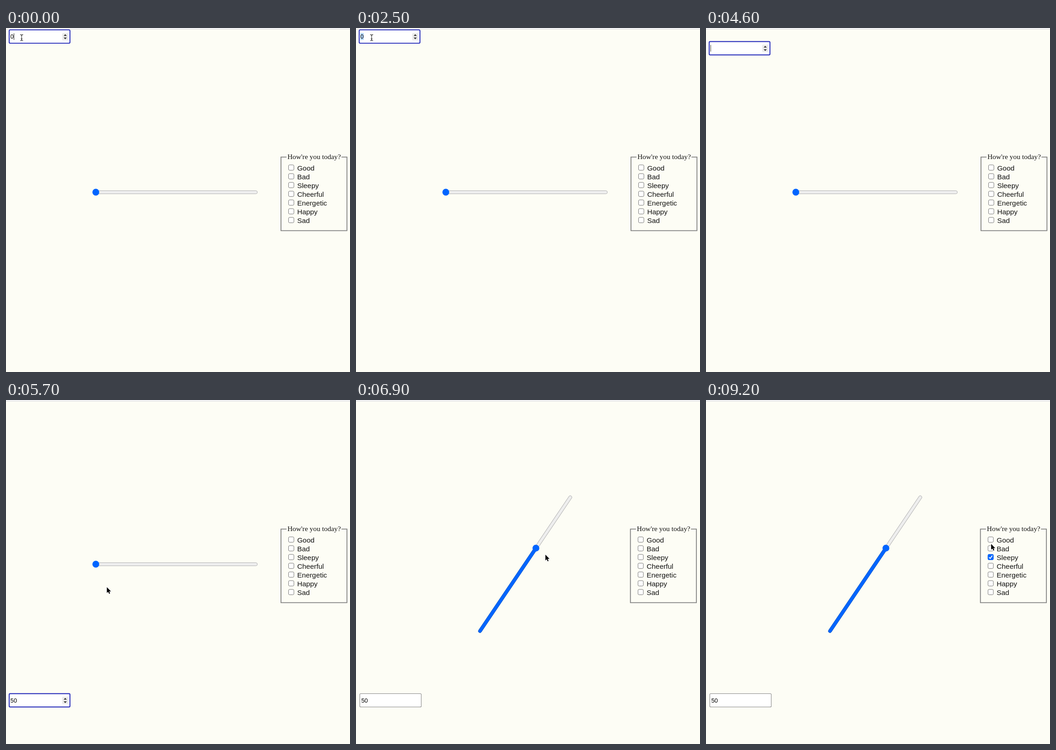
Recreate the animation shown at these times as an HTML page. Size 748 by 748 pixels, loop 9.5 s.

```html
<!DOCTYPE html>
<html lang="en">
<head>
<meta charset="utf-8">
<title>Moving inputs</title>
<style>
  html, body { margin: 0; width: 100%; height: 100%; overflow: hidden; background: #fdfdf5; }
  svg { display: block; width: 748px; height: 748px; }
  text { font-family: "Liberation Sans", Arial, sans-serif; font-size: 15.35px; fill: #111; }
  .legend { font-family: "Liberation Serif", "Times New Roman", serif; }
  .value { font-size: 12.8px; fill: #000; }
  .line { fill: none; stroke: #808080; stroke-width: 1.8; }
  .box { fill: #fff; stroke: #767676; stroke-width: 1; }
</style>
</head>
<body>
<svg viewBox="0 0 748 748">
  <rect width="748" height="2" fill="#fff"/>
  <rect y="1.6" width="748" height="1.4" fill="#dcdce0"/>

  <g id="slider">
    <rect id="track" x="189" y="353.7" width="357.6" height="6.8" rx="3.4"/>
    <rect id="fill" x="188.8" y="353.5" height="7.2" rx="3.6" stroke-width=".8"/>
    <circle id="thumb" cy="357" r="7.4"/>
  </g>

  <g id="form">
    <path class="line" d="M610 280.6H597.9V440.6H741.4V280.6H729.5"/>
    <text class="legend" x="612" y="285.4">How're you today?</text>
  </g>

  <g id="input">
    <rect id="frame" height="29" rx="2" fill="#fff"/>
    <rect id="mark" x="9.5" y="11" width="7.3" height="15" fill="#b3d7fe"/>
    <text id="value" class="value" y="23.3"></text>
    <g id="spin">
      <rect x="122" y="11" width="14" height="16" rx="2" fill="#ececec"/>
      <path d="M125.3 17.2L128.8 13.4L132.3 17.2ZM125.3 20.8L128.8 24.6L132.3 20.8Z" fill="#333"/>
    </g>
    <rect id="caret" y="11.5" width="1" height="14.5" fill="#222"/>
  </g>

  <path id="beam" d="M30.8 14.4Q34 14.4 34 16.6Q34 14.4 37.2 14.4M34 16V26M30.8 27.8Q34 27.8 34 25.6Q34 27.8 37.2 27.8M32.3 23.6H35.7" fill="none" stroke="#222" stroke-width="1.1"/>
  <path id="arrow" d="M0 0V12.6L2.9 9.9L4.9 14.5L7 13.6L5 9.2H9Z" fill="#000" stroke="#fff" stroke-width="1.5" paint-order="stroke"/>
</svg>
<script>
const LOOP = 9500, STEP = 100;
const el = id => document.getElementById(id);
const set = (id, attrs) => {
  for (const k in attrs) el(id).setAttribute(k, attrs[k]);
};
const show = (id, on) => { el(id).style.display = on ? '' : 'none'; };
const within = (t, ...spans) => spans.some(([a, b]) => t >= a && t < b);

// Last entry [time, value] that has begun
const stepAt = (keys, t) => keys.filter(k => k[0] <= t).pop()[1];

// Linear blend of every column in [time, ...values]
function blend(keys, t) {
  const i = keys.findIndex(k => k[0] > t);
  if (i < 0) return keys[keys.length - 1].slice(1);
  if (i === 0) return keys[0].slice(1);
  const a = keys[i - 1], b = keys[i], p = (t - a[0]) / (b[0] - a[0]);
  return a.slice(1).map((v, n) => v + (b[n + 1] - v) * p);
}

const moods = ['Good', 'Bad', 'Sleepy', 'Cheerful', 'Energetic', 'Happy', 'Sad'];
el('form').insertAdjacentHTML('beforeend', moods.map((mood, i) => {
  const y = 303.5 + i * 19.03;
  return `<rect class="box" x="614.4" y="${y - 5.8}" width="11.6" height="11.6" rx="2.3"/>
    <text x="633.2" y="${y + 6}">${mood}</text>`;
}).join('') + `<g id="check"><rect x="613.9" y="335.3" width="12.6" height="12.6" rx="2.4" fill="#0065ff"/>
  <path d="M616.6 341.9L619.2 344.6L623.8 338.2" fill="none" stroke="#fff" stroke-width="1.9"/></g>`);

const typed = [[0, '0'], [3000, '2'], [3200, '20'], [4300, '2'], [4400, ''], [4800, '5'], [4900, '50']];
const heights = typed.filter(k => k[1] !== '');  // an empty field keeps its place
const drag = [[6200, 0], [6500, .235], [6800, .622]];
const mouse = [
  [5200, 165, 236], [5700, 219.3, 407], [5900, 213, 392], [6200, 195.5, 352],
  [6500, 303.5, 349.5], [6800, 411.8, 336.3], [7200, 411.8, 336.3], [7700, 618, 340],
  [8300, 618, 340], [8700, 620, 317], [8800, 620, 317], [9200, 620, 313]
];

function draw(t) {
  const focus = t < 6300;
  const shift = focus ? 0 : t < 6700 ? -1.6 : -1.2;
  const text = stepAt(typed, t);
  const left = focus ? 9.6 : 12.4 + shift * .8;

  set('input', { transform: `translate(0 ${stepAt(heights, t) * 12.687})` });
  set('frame', focus
    ? { x: 6.9, y: 4.1, width: 132.2, stroke: '#1c22b8', 'stroke-width': 1.9 }
    : { x: 9.5 + shift, y: 4.2, width: 133.6, stroke: '#858585', 'stroke-width': 1.1 });
  el('value').textContent = text;
  set('value', { x: left });
  set('caret', { x: left + text.length * 7.12 + .1 });
  show('caret', within(t, [0, 500], [1000, 1500], [3000, 3800], [4000, 5400], [5900, 6300]));
  show('mark', within(t, [2000, 3000]));
  show('spin', focus);

  const [f] = blend(drag, t);
  const held = within(t, [6300, 6800]);
  const blue = held ? '#2883fb' : '#0065ff';
  set('slider', { transform: `rotate(${-90 * f} 367.7 357.1)` });
  set('track', { fill: held ? '#f4f4f4' : '#eee', stroke: held ? '#c9c9cc' : '#b2b2b2' });
  set('fill', { width: 6.5 + 345 * f, fill: blue, stroke: held ? '#1f72df' : '#0b56c8' });
  set('thumb', { cx: 195.3 + 345 * f, fill: blue });

  set('form', { transform: `translate(${shift} 0)` });
  show('check', t >= 8100);

  show('beam', t < 3000);
  show('arrow', t >= 5200);
  set('arrow', { transform: `translate(${blend(mouse, t)})` });
}

function tick(now) {
  draw(Math.floor((now % LOOP) / STEP) * STEP);
  requestAnimationFrame(tick);
}
draw(0);
requestAnimationFrame(tick);
</script>
</body>
</html>
```
